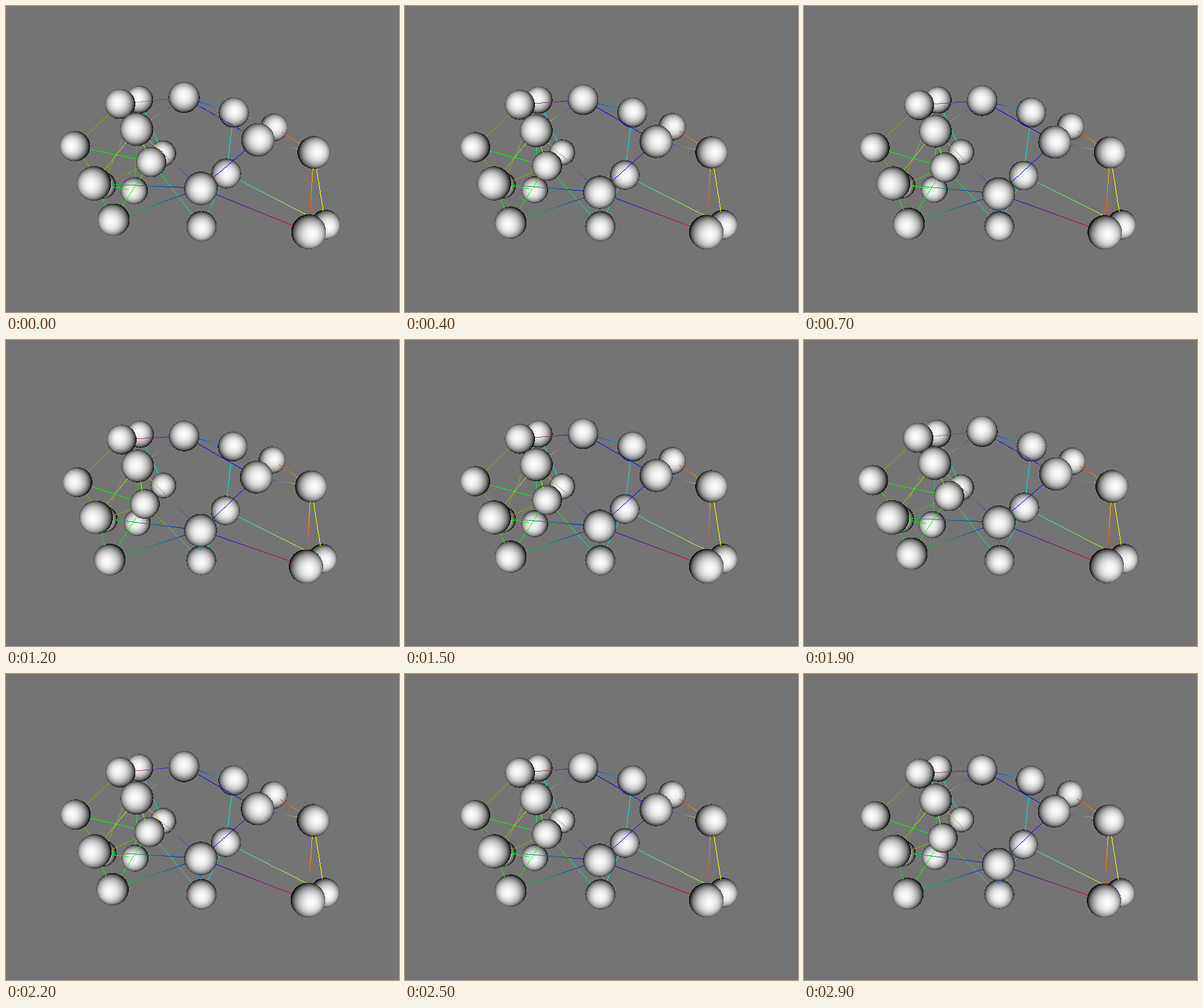
A matplotlib script that plays this animation: 596x464 px, repeating every 3500 ms.

```python
import numpy as np
import matplotlib.pyplot as plt
from matplotlib.animation import FuncAnimation

W, H, DPI = 596, 464, 64
FRAMES, STEP = 35, 100
FOCAL = 516
LIGHT = 750          # distance that sets how far highlights lean outwards
BACK = 116

HUES = dict(r=(255, 0, 0), o=(255, 110, 0), y=(255, 255, 0),
            g=(0, 255, 0), c=(0, 225, 225), b=(0, 0, 255))

# x, y, radius, drop over one full swing, hue
NODES = dict(
    a=(173, 148.5, 23, 2.5, "o"), b=(202, 142, 21, 1, "c"),
    c=(270, 138.5, 23.6, 7, "b"), d=(345.5, 161.5, 23, 0, "c"),
    e=(406.5, 184, 21, -2, "r"), f=(382, 203, 25.3, 5, "b"),
    g=(467, 222, 24.8, 0, "y"), h=(104.5, 212.5, 23, 3, "g"),
    i=(198, 187, 25.2, 4, "y"), j=(220, 236.5, 23, 12, "g"),
    k=(238, 223.5, 19.8, -3, "c"), l=(133.5, 269, 26, 0, "g"),
    m=(147, 272, 20, 0, "o"), n=(194.5, 280, 20.5, -3, "g"),
    o=(163, 324, 24.5, 9, "g"), p=(295.5, 276.5, 25.4, 12, "b"),
    q=(296.5, 334, 23, 0, "c"), r=(334, 254, 22.6, 4.5, "c"),
    s=(484.5, 331.5, 22.5, 0, "y"), t=(459, 342.5, 26.4, 1, "r"),
)
EDGES = ("ah ac cd cf ci de dr eg fg fp gs gt hj hm ij il ip "
         "bk bm bn jm jo jq ln lo lp op pq pt qr rs").split()

# how far the net has swung at the turning points, in steps
KEY_STEP = (0, 4, 12, 15, 19, 20, 25, 29)
KEY_SWING = (0, .5, 1, .5, 0, .1, .5, 1)
HELD = {1, 3, 16, 21, 23, 28}


def swing(n):
    return np.interp(n - 1 if n in HELD else n, KEY_STEP, KEY_SWING)


def place(x, y, r, drop, s):
    """The net narrows and sags; its low left part also swings out."""
    dx = .022 * (275 - x)
    if x < 275 and y > 230:
        dx -= .9 * drop
    return np.array([x + s * dx - .5, y + s * drop - .5]), r * (1 - .02 * s)


def draw_ball(img, depth, center, r):
    x, y = center
    x0, x1 = int(x - r) - 1, int(x + r) + 2
    y0, y1 = int(y - r) - 1, int(y + r) + 2
    gy, gx = np.mgrid[y0:y1, x0:x1]
    nx, ny = (gx - x) / r, (gy - y) / r
    d2 = nx ** 2 + ny ** 2
    nz = np.sqrt(np.clip(1 - d2, 0, 1))

    lean = np.array([x - W / 2, y - H / 2, LIGHT])
    lx, ly, lz = lean / np.linalg.norm(lean)
    shade = np.clip(nx * lx + ny * ly + nz * lz, 0, 1)

    z = FOCAL / r - nz
    part = depth[y0:y1, x0:x1]
    show = (d2 <= 1) & (z < part)
    part[show] = z[show]
    img[y0:y1, x0:x1][show] = (6 + 246 * shade[show])[:, None]


def draw_edge(img, depth, a, b, ra, rb, hue_a, hue_b):
    t = np.linspace(0, 1, int(np.abs(b - a).max()) + 1)
    px, py = np.rint(a[:, None] + (b - a)[:, None] * t).astype(int)
    z = FOCAL / (ra + (rb - ra) * t)
    show = z < depth[py, px]
    color = np.outer(1 - t, hue_a) + np.outer(t, hue_b)
    img[py[show], px[show]] = color[show]
    depth[py[show], px[show]] = z[show]


def render(n):
    img = np.full((H, W, 3), float(BACK))
    depth = np.full((H, W), np.inf)
    s = swing(n)
    balls = {k: place(*v[:4], s) for k, v in NODES.items()}
    for center, r in balls.values():
        draw_ball(img, depth, center, r)
    for u, v in EDGES:
        (a, ra), (b, rb) = balls[u], balls[v]
        draw_edge(img, depth, a, b, ra, rb,
                  HUES[NODES[u][4]], HUES[NODES[v][4]])
    return img.astype(np.uint8)


fig = plt.figure(figsize=(W / DPI, H / DPI), dpi=DPI)
ax = fig.add_axes([0, 0, 1, 1])
ax.axis("off")
view = ax.imshow(render(0), interpolation="nearest", aspect="auto")


def update(n):
    view.set_data(render(n))
    return [view]


anim = FuncAnimation(fig, update, frames=FRAMES, interval=STEP,
                     repeat=True, repeat_delay=0, blit=False)
plt.show()
```
